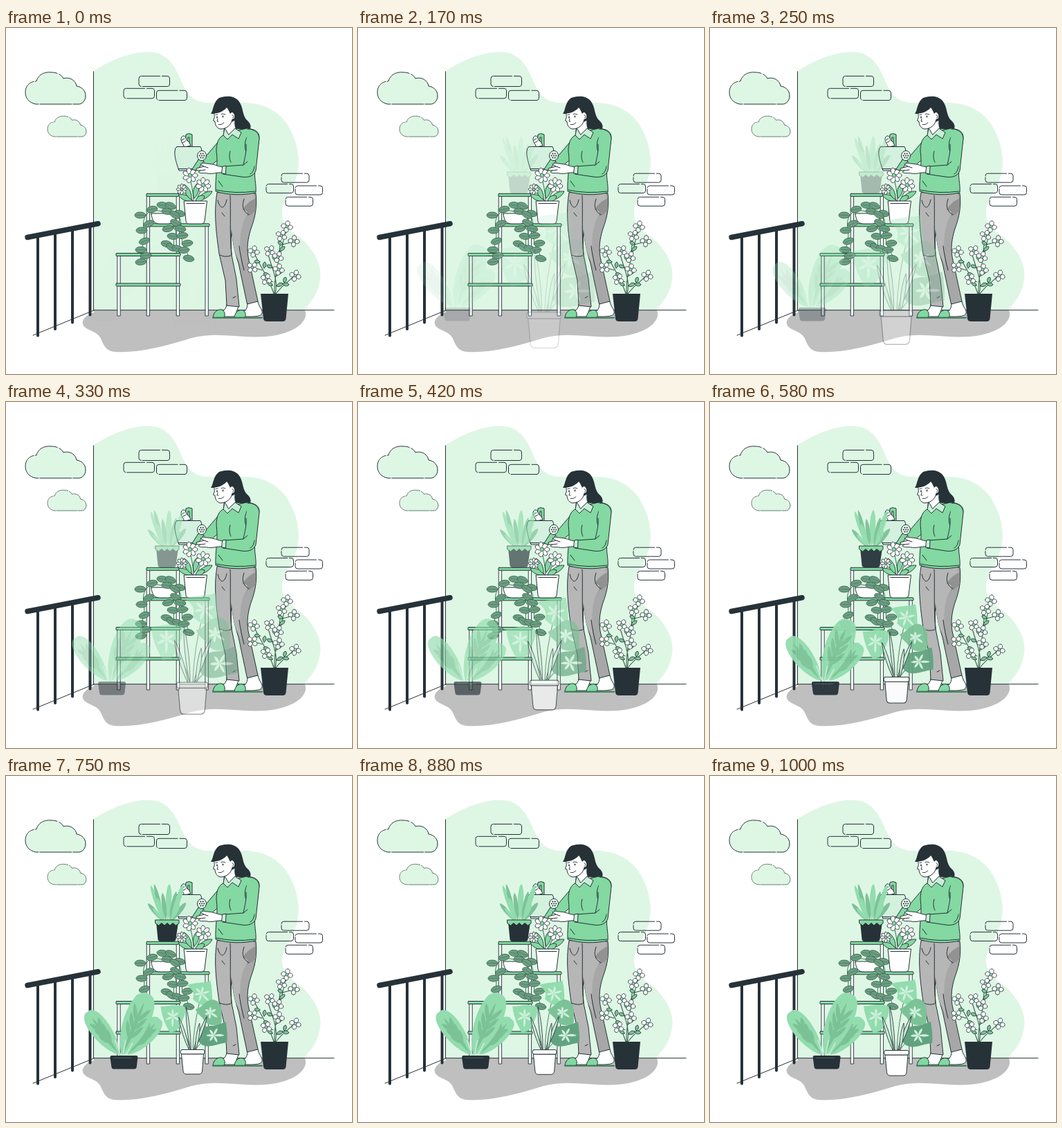
These frames come from a looping animation (500x500 px, 1.04 s). An HTML page with a canvas:

```html
<!DOCTYPE html>
<html lang="en">
<head>
<meta charset="utf-8">
<title>Balcony garden</title>
<style>
html, body { margin: 0; width: 100%; height: 100%; overflow: hidden; background: #fff; }
canvas { display: block; width: 500px; height: 500px; }
</style>
</head>
<body>
<canvas id="stage"></canvas>
<script>
const SIZE = 500, LOOP = 1040, STEP = 1000 / 24;
const INK = '#263238', GREEN = '#83d9a1', PALE = '#def7e5', MINT = '#92dcae',
      MOSS = '#6b9f82', SHADE = '#7cc297', GREY = '#b6b6b6', WHITE = '#fff';
const dpr = window.devicePixelRatio || 1;

function surface(el) {
  el.width = el.height = SIZE * dpr;
  const c = el.getContext('2d');
  c.lineCap = c.lineJoin = 'round';
  return c;
}
const view = surface(document.getElementById('stage'));
const back = surface(document.createElement('canvas'));
const layer = surface(document.createElement('canvas'));

// ---- drawing helpers ----
function paint(c, path, fill, line, w = 1) {
  const p = typeof path === 'string' ? new Path2D(path) : path;
  if (fill) { c.fillStyle = fill; c.fill(p); }
  if (line) { c.strokeStyle = line; c.lineWidth = w; c.stroke(p); }
}
const stroke = (c, d, color = INK, w = 1) => paint(c, d, null, color, w);

function oval(c, x, y, rx, ry, turn, fill, line, w) {
  const p = new Path2D();
  p.ellipse(x, y, rx, ry, turn, 0, Math.PI * 2);
  paint(c, p, fill, line, w);
}

function box(c, x, y, w, h, r, fill, line, lw) {
  const p = new Path2D();
  p.roundRect(x, y, w, h, r);
  paint(c, p, fill, line, lw);
}

// Leaf from base to tip; a larger `k` gives a rounder tip.
function leaf(c, x0, y0, x1, y1, w, fill, line, k = 0.75) {
  const n = Math.hypot(x1 - x0, y1 - y0);
  c.save();
  c.translate(x0, y0);
  c.rotate(Math.atan2(y1 - y0, x1 - x0));
  paint(c, `M0 0C${n * .3} ${-w} ${n * k} ${-w} ${n} 0C${n * k} ${w} ${n * .3} ${w} 0 0Z`, fill, line, .8);
  c.restore();
}

function flower(c, x, y, r, petals, turn = 0) {
  for (let i = 0; i < petals; i++) {
    const a = turn + i * Math.PI * 2 / petals;
    oval(c, x + Math.cos(a) * r * .6, y + Math.sin(a) * r * .6, r * .44, r * 1.35 / Math.sqrt(petals) * .58, a, WHITE, INK, .8);
  }
  oval(c, x, y, r * .27, r * .27, 0, GREEN, INK, .6);
}

// ---- still scenery ----
function cloud(c) {
  const d = 'M43 110C33 108 28 101 28 93C28 83 35 77 44 77C46 68 55 63 65 64C73 64 80 67 83 73C92 70 101 76 102 84C110 85 115 91 115 98C115 105 110 110 105 110Z';
  c.save();
  c.translate(1, .5);
  paint(c, d, PALE);
  c.restore();
  c.setLineDash([46, 2, 38, 3, 80, 2]);
  stroke(c, d);
  c.setLineDash([]);
}

function wall(c) {
  cloud(c);
  c.save();
  c.translate(42, 86.3);
  c.scale(.643, .643);
  cloud(c);
  c.restore();
  paint(c, 'M127 62C150 46 190 30 217 36C246 43 250 76 262 93C276 113 300 107 322 109C362 104 399 113 416 158C430 196 420 222 406 244C392 268 400 285 418 298C440 312 458 340 454 363C450 390 437 398 431 408H127Z', PALE);
  paint(c, 'M127 408V411C116 414 109 422 111 428C114 437 130 437 136 447C141 457 143 467 158 468C190 470 230 460 268 448C310 437 345 452 390 444C425 437 437 420 432 408Z', '#bfbfbf');
  stroke(c, 'M126.5 63V408M127 407.7H474');
  c.setLineDash([27, 3, 62, 2]);
  for (const [x, y, w, h] of [[192, 69.5, 44.5, 15], [170, 87.3, 44.5, 14.5], [217.5, 90.3, 44, 14.2],
    [398, 210.2, 40, 13], [376, 225.5, 39.5, 13], [418, 228, 39.5, 13], [404, 244.3, 39.5, 13]])
    box(c, x, y, w, h, 3.5, null, INK);
  c.setLineDash([]);
}

function railing(c) {
  stroke(c, 'M39 444L127 408');
  stroke(c, 'M46 302V444.5M71 297V435M96 292V425.5M121.5 287V414.5', INK, 4);
  stroke(c, 'M31 302.5L133 282.8', INK, 7.5);
}

function stand(c) {
  for (const [x, y] of [[161.2, 328], [203.6, 242], [246.6, 242], [288.3, 286]])
    box(c, x, y, 4, 416 - y, 0, '#f3fbf5', INK, .9);
  for (const [x, y, w] of [[203, 239.3, 47], [204, 282.8, 90], [159, 325.5, 93], [159, 369, 93]])
    box(c, x, y, w, 4, 1, GREEN, INK);
}

function hanging(c) {
  stroke(c, 'M228 266C206 258 196 272 199 290C203 306 193 320 195 338M238 266C250 266 238 280 243 290C252 300 234 306 247 320M246 268C258 278 249 290 256 300C250 313 263 320 264 333', '#44705a');
  paint(c, 'M210 268H245V274C244 281 239 283 233 283H222C215 283 211 279 210 268Z', WHITE, INK);
  const spots = [[211, 262, -.2], [226, 256, .1], [238, 257, .4], [233, 265, .1], [251, 268, .2], [244, 270, .5],
    [194, 270.5, 0], [206, 283, -.4], [196, 292.5, 0], [200, 308, -.3], [195, 320.5, 0], [202, 329, -.1], [195, 338, -.1],
    [245, 282, .5], [234, 290, -.2], [252, 290, .2], [241, 301, .1], [255, 300, -.1], [232, 312, .2],
    [239, 317, .5], [262, 311, -.1], [248, 319, .3], [257, 321, -.1], [264, 333, .2]];
  for (const [x, y, a] of spots) {
    oval(c, x, y, 8, 4.5, a, MOSS, '#365d4b', .8);
    const dx = Math.cos(a) * 6, dy = Math.sin(a) * 6;
    stroke(c, `M${x - dx} ${y - dy}L${x + dx} ${y + dy}`, '#416e58', .6);
  }
}

function can(c) {
  paint(c, 'M258 172L260 154Q264 151 269 154V172H265V158H263L262 172Z', GREEN, INK);
  paint(c, 'M256 168C252 164 252 157 256 156C261 155 259 163 264 164L267 170L258 172Z', WHITE, INK);
  stroke(c, 'M254 162L258 160M255 166L260 163');
  paint(c, 'M247 171.5H281C285 179 283 186 279 194C276 199 277 206 274 206H250C247 198 243 185 244 178Q244 173 247 171.5Z', '#d3f1de', INK);
  stroke(c, 'M249 203.5H276');
}

function potted(c) {
  stroke(c, 'M271 250C271 236 268 227 266 217M275 250C277 242 282 235 285 229M268 250C264 242 258 238 254 234', '#3d8660', 1.2);
  for (const [x0, y0, x1, y1] of [[270, 250, 249, 241], [268, 248, 257, 226], [276, 249, 298, 236], [272, 246, 277, 224], [274, 250, 287, 243]])
    leaf(c, x0, y0, x1, y1, 5, GREEN, INK);
  flower(c, 254, 233, 7.5, 8);
  flower(c, 285, 227, 10.5, 7, .2);
  flower(c, 266, 213, 10.5, 7);
  paint(c, 'M257.5 250H290.5L287 279Q286.5 283 283 283H264Q260.5 283 260 279Z', WHITE, INK);
  stroke(c, 'M261 253.5H287');
}

function woman(c) {
  // feet
  paint(c, 'M319 400L336 401C335 409 330 411 334 417H305C307 411 318 410 319 400Z', WHITE, INK);
  paint(c, 'M349 397L364 395C366 405 371 406 370 412C369 417 360 417 348 417H336C342 411 350 408 349 397Z', WHITE, INK);
  paint(c, 'M299 418C300 410 306 406 312 407C317 410 317 415 315 418Z', GREEN, INK);
  paint(c, 'M330 418C331 411 336 406 343 408C347 412 347 415 345 418Z', GREEN, INK);
  stroke(c, 'M299 418.8H370', '#357d55', 2);
  // trousers
  paint(c, 'M326 239H361C363 255 361 272 354 290C349 306 348 317 350 331L364 395L348.5 399L336 340C331 325 325 300 324 268Z', '#a7a7a7', INK);
  paint(c, 'M305 238C301 261 302 285 308 326L317 365L319 401L337 403L333 363L326 328C324 303 326 288 330 273L350 240Z', GREY, INK);
  paint(c, 'M326 239H358L360 261C352 268 344 272 341 288C337 306 338 325 340 343L333 330C327 312 325 290 325 265Z', GREY);
  paint(c, 'M361 246C351 250 344 258 342 263C349 262 351 268 347 273C354 270 361 266 361 260Z', '#929292');
  stroke(c, 'M324 242C325 265 323 301 326 328M306 249C309 262 316 263 319 248M344 247C341 256 341 264 351 270M312 267L316 272M337 315C338 325 341 339 344 350');
  stroke(c, 'M309 328Q316 332 325 329M328 390L332 388');
  // far arm and spout
  paint(c, 'M307 164L284 191C287 196 291 199 296 199L308 189Z', GREEN, INK);
  paint(c, 'M269 204L278 190L286 192L276 206Z', GREEN, INK);
  oval(c, 283, 184.5, 6.5, 7.2, .2, '#e9f8ee', INK);
  for (let i = 0; i < 6; i++)
    oval(c, 283 + 3.2 * Math.cos(i * Math.PI / 3), 184.5 + 3.6 * Math.sin(i * Math.PI / 3), 1, 1, 0, INK);
  oval(c, 283, 184.5, 1, 1, 0, INK);
  // back hair, neck, jumper
  paint(c, 'M302 111C307 98 325 95 335 104C343 112 341 124 347 132C354 138 355 143 352 147C342 148 329 146 322 141Z', INK);
  paint(c, 'M316 140L331 133C330 143 332 147 337 149L321 158L315 153Z', WHITE, INK);
  paint(c, 'M316 154C307 157 304 166 304 178C307 198 302 216 303 236C321 242 343 242 361 238C362 225 358 215 360 204L366 158C366 149 358 146 348 145L335 148L321 158Z', GREEN, INK);
  paint(c, 'M316 145L314 155L320 161L327 154L336 160L340 151L331 145L322 154Z', '#c7eed5', INK);
  stroke(c, 'M324 178C322 184 323 190 325 194M304 234Q330 240 360 236M307 221L313 229M349 156C345 163 344 171 347 179');
  paint(c, 'M347 168C348 177 345 188 343 198L315 200L313 211L340 215C351 217 359 213 361 206L366 160C366 151 359 146 349 146', GREEN, INK);
  stroke(c, 'M343 198L349 193M353 211C357 209 358 205 359 200');
  // near hand
  paint(c, 'M314 201C305 200 300 196 291 196C286 196 284 194 281 197L286 200L275 203Q274 206 281 206L278 208C281 211 287 209 291 210C298 212 305 208 313 209Z', WHITE, INK);
  stroke(c, 'M281 206L288 205M286 200L292 202');
  paint(c, 'M313 200L318 199L317.5 211L312 210Z', '#c7eed5', INK);
  // head
  paint(c, 'M301 118C300 124 302 127 301 130L299.5 134L302 135C302 140 305 146 311 146C319 145 325 141 327 132C331 132 332 127 329 123L321 113Z', WHITE, INK);
  paint(c, 'M296 124C300 119 299 107 308 101C318 97 331 100 335 108C338 115 336 123 331 126C328 121 326 121 324 124C322 120 321 117 319 115C313 122 304 124 296 124Z', INK);
  oval(c, 305, 129, .9, 1.4, 0, INK);
  oval(c, 313.5, 128, .9, 1.4, 0, INK);
  stroke(c, 'M303 125.5L306 125M311 124.5Q314 123 317 125M306 131L305 135H307M307 139.5Q311 141 315 137M327 126Q330 126 328 130', INK, .9);
}

function bush(c) {
  stroke(c, 'M388 384C387 355 397 328 405 289M389 384C394 363 384 348 378 324M387 384C380 361 368 346 359 326M390 384C399 372 407 367 416 359M394 335L397 303M399 313L415 309M386 367L376 364M370 350L357 346M391 359L394 350', '#356048', 1.1);
  for (const [x, y, dx, dy] of [[402, 297, 5, -8], [395, 322, 8, -6], [393, 337, -8, -7], [385, 346, -8, -3], [391, 356, 8, -5],
    [380, 357, -8, -2], [373, 347, 1, -9], [367, 338, -8, -1], [391, 373, 9, -4], [402, 368, 2, -8], [385, 372, -7, -4], [400, 313, -7, -4], [400, 370, 9, 1]])
    leaf(c, x, y, x + dx, y + dy, 3.2, SHADE, INK);
  for (const [x, y, a] of [[406, 287, .2], [398, 300, .5], [416, 308, .1], [381, 322, .6], [358, 323, .2],
    [393, 331, .4], [356, 346, .7], [394, 349, .2], [376, 363, .5], [418, 358, .3]])
    flower(c, x, y, 8, 4, a);
  paint(c, 'M368 384H408L404.5 420Q404 424 400 424H377Q372.5 424 372 420Z', INK);
}

// ---- plants that arrive ----
function topPlant(c) {
  for (const [x, y, w, tone] of [[205, 184, 4, 1], [209, 158, 4, 0], [214, 156, 3.5, 1], [236, 156, 5.5, 0], [246, 167, 4, 1],
    [256, 157, 5, 0], [260, 183, 4.5, 1], [218, 176, 4, 0], [226, 169, 4, 1], [251, 186, 4, 0], [212, 191, 3, 0]])
    leaf(c, 233 + (x - 233) * .25, 209, x, y, w, tone ? SHADE : MINT, null, .9);
  paint(c, 'M217 211H249L245.5 236Q245 239 242 239H223Q220 239 219.5 236Z', INK);
  paint(c, 'M216 208H250V213L245.5 216L241 212.5L237 216L233 212.5L229 216L225 212.5L220.5 216L216 213Z', GREEN, INK);
}

function broadLeaf(c, x0, y0, x1, y1, w) {
  leaf(c, x0, y0, x1, y1, w, MINT, null, 1.06);
  const at = (k, s) => [x0 + (x1 - x0) * k - (y1 - y0) * s, y0 + (y1 - y0) * k + (x1 - x0) * s];
  leaf(c, ...at(.05, 0), ...at(.86, 0), 4, SHADE);
  for (const k of [.38, .52, .66])
    for (const s of [-1, 1])
      leaf(c, ...at(k - .12, 0), ...at(k + .14, s * w / 190), 4, SHADE);
}

function leftPlant(c) {
  broadLeaf(c, 162, 403, 116, 341, 19);
  broadLeaf(c, 174, 403, 220, 351, 18);
  broadLeaf(c, 166, 404, 203, 315, 25);
  stroke(c, 'M164 404L156 382M167 404L171 382M171 404L181 386', '#c6ecd5', 1.6);
  paint(c, 'M151 404H186Q189 404 188.5 407L187 420Q186.5 423.5 183 423.5H154Q151 423.5 150.5 420L148.7 407Q148.5 404 151 404Z', INK);
  stroke(c, 'M153 407.5H180', '#55636a', .8);
}

function veins(c, x, y, turn, r) {
  for (const [a, k] of [[0, 1], [1.1, .75], [2.2, .65], [3.1, .7], [4.1, .65], [5.2, .75]])
    leaf(c, x, y, x + Math.cos(a + turn) * r * k, y + Math.sin(a + turn) * r * k, 2.2, '#d0f0dc');
}

function frontPlant(c) {
  stroke(c, 'M267 398C263 377 252 362 242 350M270 398C271 368 276 340 282 318M272 398C278 372 286 354 296 344M273 398C280 387 288 380 299 374', '#4d7b63');
  paint(c, 'M222 332C229 333 236 330 242 330C250 330 259 331 259 336C259 347 253 355 251 361C248 368 243 370 236 371C231 363 224 350 222 332Z', MINT);
  veins(c, 240, 347, 1.6, 16);
  paint(c, 'M261 301C270 296 284 298 296 294C299 305 299 318 299 330C288 334 278 329 270 321C274 312 268 305 261 301Z', MINT);
  veins(c, 283, 313, .8, 17);
  paint(c, 'M274 336C282 336 286 325 297 322C309 321 313 332 313 340C312 348 315 354 311 359C302 361 291 361 286 352C284 347 276 344 274 336Z', SHADE);
  veins(c, 296, 341, .6, 13);
  paint(c, 'M278 378C281 366 286 362 296 361C306 361 312 357 319 355C321 366 322 377 321 386C309 387 299 393 288 391C281 389 277 384 278 378Z', '#62a37f');
  veins(c, 301, 375, 0, 16);
  for (const [x0, x1, y1, w] of [[265, 249, 348, 2.8], [267, 260, 333, 2.6], [271, 291, 347, 3], [274, 280, 357, 2.8]])
    leaf(c, x0, 398, x1, y1, w, '#c9edd7', INK);
  paint(c, 'M253.3 403H286L284 428Q283.5 433 279 433H260Q256 433 255.5 428Z', WHITE, INK);
  box(c, 251.8, 396.5, 35.4, 6.5, 2, WHITE, INK);
}

// ---- timing ----
// Cubic Bezier ease with control points (.36, -.01) and (.5, 1.38).
function ease(x) {
  const curve = (s, a, b) => 3 * (1 - s) ** 2 * s * a + 3 * (1 - s) * s * s * b + s ** 3;
  let lo = 0, hi = 1;
  for (let i = 0; i < 24; i++) {
    const mid = (lo + hi) / 2;
    if (curve(mid, .36, .5) < x) lo = mid; else hi = mid;
  }
  return curve((lo + hi) / 2, -.01, 1.38);
}

function place(draw, alpha, dx = 0, scale = 1) {
  layer.setTransform(dpr, 0, 0, dpr, 0, 0);
  layer.clearRect(0, 0, SIZE, SIZE);
  layer.translate(271 + dx, 363);
  layer.scale(scale, scale);
  layer.translate(-271, -363);
  draw(layer);
  view.globalAlpha = Math.max(0, Math.min(1, alpha));
  view.drawImage(layer.canvas, 0, 0);
  view.globalAlpha = 1;
}

function render(ms) {
  const tick = Math.floor((ms % LOOP + 5) / STEP);
  const p = ease(Math.min(1, (tick + 1) / 24));
  view.drawImage(back.canvas, 0, 0);
  place(topPlant, p);
  place(leftPlant, p, -30 * (1 - p));
  place(frontPlant, p, 0, 1.5 - .5 * p);
}

back.scale(dpr, dpr);
back.fillStyle = WHITE;
back.fillRect(0, 0, SIZE, SIZE);
for (const part of [wall, railing, stand, hanging, can, potted, woman, bush]) part(back);

const start = performance.now();
function loop() {
  render(performance.now() - start);
  requestAnimationFrame(loop);
}
loop();
</script>
</body>
</html>
```
